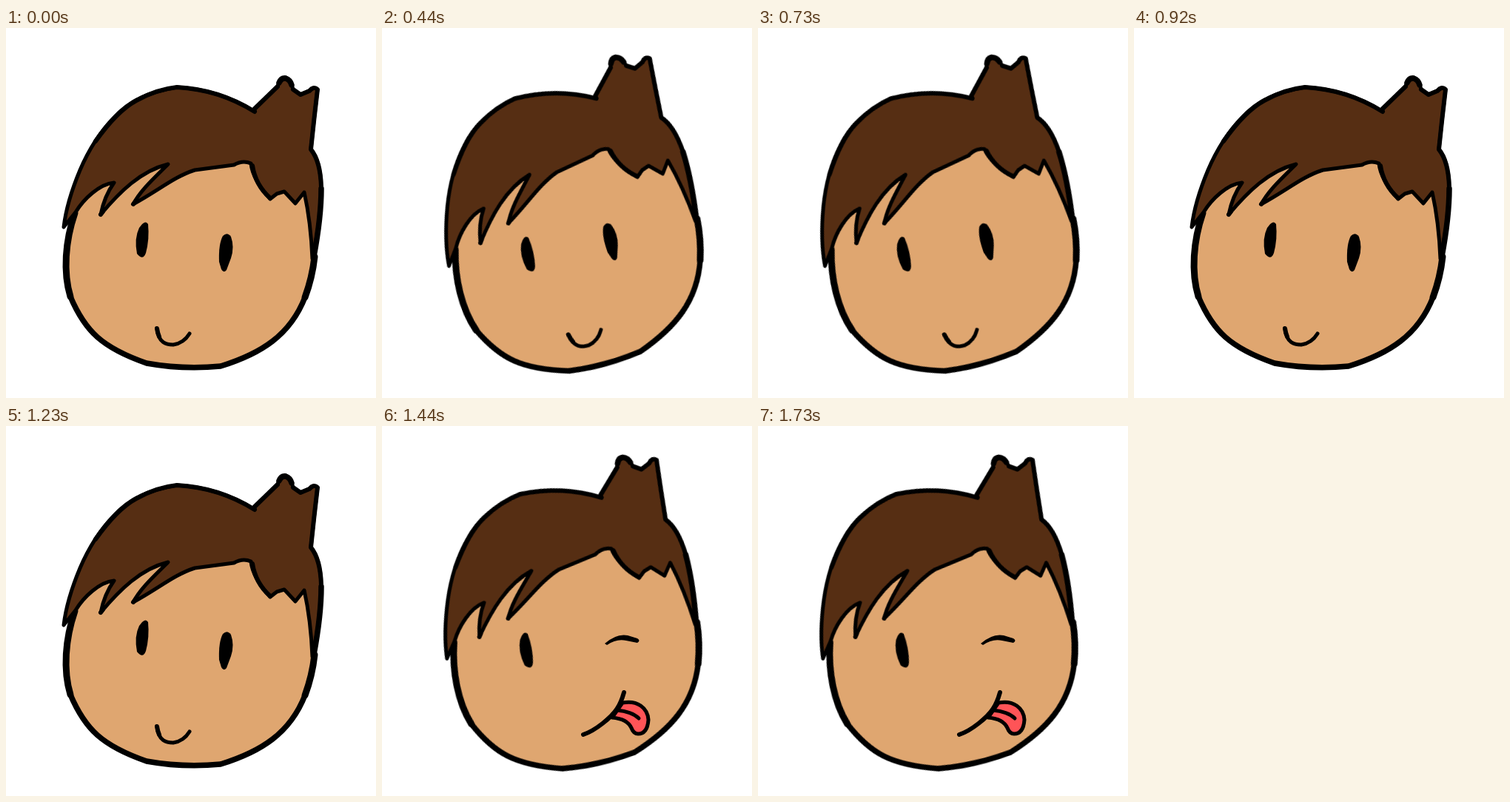
An HTML page without scripts for the animation above (1920 ms loop, 500x500 px).

```html
<!DOCTYPE html>
<html lang="en">
<head>
<meta charset="utf-8">
<title>Wobbling head</title>
<style>
  html, body { margin: 0; width: 100%; height: 100%; overflow: hidden; background: #fff; }
  svg { display: block; width: 100%; height: 100%; }
  .line { fill: none; stroke: #000; stroke-width: 5; stroke-linecap: round; stroke-linejoin: round; }
  .skin { fill: #dfa670; }
  .hair { fill: #562e13; }
  .tongue { fill: #ff5457; }
  .medium { stroke-width: 6; }
  .bold { stroke-width: 7.5; }
  .heavy { stroke-width: 9; }

  /* Poses cut hard at 440, 920 and 1440 ms of 1920 ms */
  .head, .smile, .wink { animation: 1920ms step-end infinite; }
  .head { animation-name: tilt; }
  .smile { animation-name: smile; }
  .wink { animation-name: wink; }
  @keyframes tilt {
    0%, 47.9167% { transform: none; }
    22.9167% { transform: translate(-64.8px, 88.5px) rotate(-17.5deg); }
    75%, 100% { transform: translate(-57.2px, 74.6px) rotate(-15deg); }
  }
  @keyframes smile {
    0% { visibility: visible; }
    75%, 100% { visibility: hidden; }
  }
  @keyframes wink {
    0% { visibility: hidden; }
    75%, 100% { visibility: visible; }
  }
</style>
</head>
<body>
<svg viewBox="0 0 500 500">
  <g class="head">
    <!-- face -->
    <path class="skin" d="M93 250C80 288 77 330 87 363C107 410 130 432 190 453Q240 462 290 457C345 440 384 415 404 364Q414 337 417 309L420 285L400 150L200 150L120 180Z"/>
    <path class="line bold" d="M87 363C107 410 130 432 190 453Q240 462 290 457C345 440 384 415 404 364"/>
    <path class="line heavy" d="M93 250C80 288 77 330 87 363M404 364Q414 337 417 309"/>

    <!-- hair -->
    <path class="line hair" d="M78 269Q82 235 100 192Q118 150 145 122C168 97 195 86 231 80Q288 83 336 113L336 109L367 79Q370 67 378 67Q385 69 388 83L398 90L410 85Q416 78 421 83Q416 125 412 164Q425 180 426 215Q426 255 414 312Q412 262 403 222L391 237L376 221L366 224L357 231C348 221 333 203 331 183Q320 178 308 185L255 192C227 201 207 219 172 238C182 219 200 203 219 184C182 193 153 222 128 252Q133 227 146 209C126 211 105 231 94 249Z"/>
    <path class="line medium" d="M121 153Q150 112 176 98Q203 83 231 80Q288 83 336 113M336 109L367 79M388 83L398 90L410 85Q416 78 421 83Q416 125 412 164Q425 180 426 215"/>
    <path class="line bold" d="M369 74Q372 67 378 68Q384 70 386 77M426 217Q426 255 416 309"/>
    <path class="line medium" d="M333 186Q337 212 357 230M128 252L131 248M172 238L176 233"/>

    <!-- eyes and smile -->
    <path d="M184 265Q189 260 192 265Q194 286 189 304Q185 315 177 305Q173 284 180 270Z"/>
    <g class="smile">
      <path d="M293 281Q299 275 304 282Q309 296 304 311L298 327Q294 332 291 326L288 316Q287 292 293 281Z"/>
      <path class="line" d="M204 406C206 426 217 428 226 428Q240 426 248 413"/>
      <path class="line medium" d="M204 406Q205 413 207 417"/>
    </g>
  </g>

  <!-- wink and tongue -->
  <g class="wink">
    <path d="M301 294Q317 280 332 283L345 287Q350 290 345 293L330 290Q317 287 304 296Z"/>
    <path class="line tongue" d="M325 374C345 370 359 381 360 397C359 411 353 416 346 416Q340 416 337 408C333 399 322 395 311 394Z"/>
    <path class="line" d="M317 384Q338 386 347 395"/>
    <path class="line medium" d="M272 417Q284 413 298 402C316 388 322 378 327 360"/>
  </g>
</svg>
</body>
</html>
```
